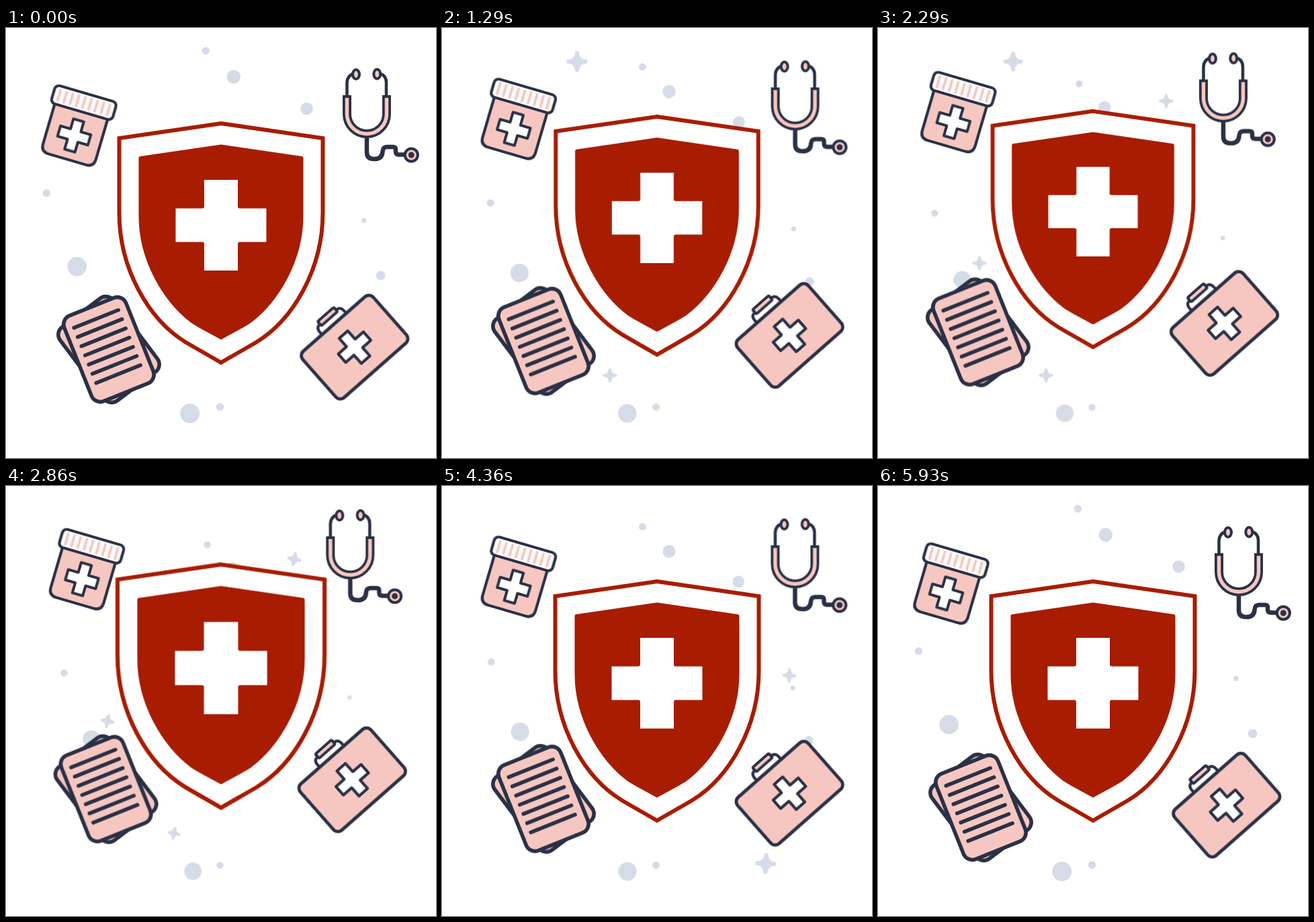
An HTML page that plays this animation: 640 px wide and 640 px high, repeating every 6000 ms.

```html
<!DOCTYPE html>
<html lang="en">
<head>
<meta charset="utf-8">
<title>Health shield</title>
<style>
  html, body { margin: 0; width: 100%; height: 100%; overflow: hidden; background: #fff; }
  svg { display: block; width: 100vw; height: 100vh; }

  .drift, .rise, .pulse, #dots {
    animation: 6s cubic-bezier(.333, 0, .667, 1) infinite;
  }
  .drift { animation-name: drift; }
  .rise { animation-name: rise; }
  .pulse { animation-name: pulse; transform-origin: 320px 320px; }
  #dots { animation-name: shrink; transform-origin: 320px 570px; fill: #d5dbe7; }
  .wobble { animation: wobble 1s -.21s ease-in-out infinite alternate; }

  @keyframes drift {
    0%, 97.6%, 100% { transform: none; }
    45.5% { transform: translate(var(--x), var(--y)); }
  }
  @keyframes shrink {
    0%, 98.5%, 100% { transform: none; }
    46.5% { transform: scale(.9); }
  }
  @keyframes rise {
    0% { transform: none; animation-timing-function: cubic-bezier(.3, .15, .7, .85); }
    44.5% { transform: translateY(-23px); }
    72.3%, 100% { transform: none; }
  }
  @keyframes pulse {
    0%, 19% { transform: none; }
    31.5% { transform: scale(.954); }
    45% { transform: scale(1.02); }
    56%, 100% { transform: none; }
  }
  @keyframes wobble {
    from { transform: rotate(-12deg); }
    to { transform: rotate(12deg); }
  }

  .line { fill: none; stroke: #2a3146; stroke-linecap: round; stroke-linejoin: round; }
  .pink { fill: #f6c7c0; }
  .white { fill: #fff; }
  .pale { fill: #d5dbe7; stroke: #d5dbe7; stroke-linejoin: round; }
  .red { stroke: #a81c02; stroke-linejoin: round; }
</style>
</head>
<body>
<svg viewBox="0 0 640 640">
  <defs>
    <path id="plus" d="M-8-23.5H8V-8H23.5V8H8V23.5H-8V8H-23.5V-8H-8Z"/>
    <rect id="sheet" x="-49.5" y="-68.5" width="99" height="137" rx="14"/>
    <path id="star" d="M0-12Q.8-.8 12 0Q.8.8 0 12Q-.8.8-12 0Q-.8-.8 0-12Z"/>
  </defs>

  <g id="dots"></g>
  <g id="stars"></g>

  <g class="rise"><g class="pulse">
    <path class="red" fill="#fff" stroke-width="6" style="stroke-linejoin:miter"
      d="M320 142L471.5 164V275C471.5 358 428 434 372 468C355 478 337 488 320 498C303 488 285 478 268 468C212 434 168.5 358 168.5 275V164Z"/>
    <path class="red" fill="#a81c02" stroke-width="5"
      d="M320 176L440 193.5V280C440 345 404 406 362 437.5C349 446 334 453 320 461C306 453 291 446 278 437.5C236 406 200 345 200 280V193.5Z"/>
    <path fill="#fff"
      d="M295 226H345V265.5Q345 268.5 348 268.5H387.5V318.5H348Q345 318.5 345 321.5V361H295V321.5Q295 318.5 292 318.5H252.5V268.5H292Q295 268.5 295 265.5Z"/>
  </g></g>

  <!-- pill bottle -->
  <g class="drift" style="--x:11.6px;--y:-21.5px">
    <g class="line" stroke-width="4.2" transform="translate(101.5 160) rotate(16.3)">
      <path class="pink" d="M-41-39V25Q-41 37-29 37H29Q41 37 41 25V-39Z"/>
      <rect class="white" x="-47.5" y="-65" width="95" height="28" rx="6.5"/>
      <path id="ridges" stroke="#f6c7c0" stroke-width="4"/>
      <use href="#plus" class="white" stroke-width="4"/>
    </g>
  </g>

  <!-- stethoscope -->
  <g class="drift" style="--x:-24.8px;--y:-25.2px">
    <g class="line" stroke-width="4.5">
      <path d="M507.5 102V81Q508 71 517 68M566 102V81Q566 71 557 68"/>
      <ellipse class="pink" cx="521" cy="69" rx="5" ry="7" stroke-width="4"/>
      <ellipse class="pink" cx="552.3" cy="68.5" rx="5" ry="7" stroke-width="4"/>
      <path stroke-width="6.5" d="M537 163V185Q537 195 548 195Q560 195 560.5 184Q561 177 567 177H576Q580 177 580 181V184Q580 188.5 585 188.5H594"/>
      <path stroke-width="13" stroke-linecap="butt" d="M507.5 100V128A29.5 29.5 0 0 0 566.5 128V100"/>
      <path stroke="#f6c7c0" stroke-width="5.4" stroke-linecap="butt" d="M507.5 104V128A29.5 29.5 0 0 0 566.5 128V104"/>
      <circle class="pink" cx="603.3" cy="189" r="9.6" stroke-width="4"/>
      <circle cx="603.3" cy="189" r="2.2"/>
    </g>
  </g>

  <!-- papers -->
  <g class="drift" style="--x:-4.4px;--y:-27.5px">
    <g class="line" stroke-width="5.6" transform="translate(153 478.5)">
      <use href="#sheet" class="pink" transform="rotate(-37)"/>
      <g transform="rotate(-21.8)">
        <use href="#sheet" class="pink"/>
        <path id="text"/>
      </g>
    </g>
  </g>

  <!-- first aid kit -->
  <g class="drift" style="--x:-3.5px;--y:-38px">
    <g class="line" stroke-width="4.8" transform="translate(518.8 475) rotate(-41.4)">
      <path class="white" stroke-width="4.2" d="M-24-46V-51Q-24-60-15-60H15Q24-60 24-51V-46"/>
      <rect class="pink" x="-16" y="-65" width="32" height="8.5" rx="2" stroke-width="4.2"/>
      <rect class="pink" x="-70" y="-46" width="140" height="92" rx="9"/>
      <use href="#plus" class="white" stroke-width="4" transform="scale(1.06)"/>
    </g>
  </g>
</svg>
<script>
  const LOOP = 6000, POP = 600;
  const $ = id => document.getElementById(id);

  function add(parent, tag, attrs) {
    const el = document.createElementNS('http://www.w3.org/2000/svg', tag);
    for (const key in attrs) el.setAttribute(key, attrs[key]);
    return parent.appendChild(el);
  }

  const repeat = (n, fn) => Array.from({ length: n }, (_, i) => fn(i)).join('');
  $('ridges').setAttribute('d', repeat(9, i => `M${(i - 4) * 9.6}-59v16`));
  $('text').setAttribute('d', repeat(7, i => `M-36 ${(i - 3) * 14.75 - 5}h71`));

  function dot(cx, cy, r) {
    add($('dots'), 'circle', { cx, cy, r });
  }

  // Pops in at start, is gone at end (ms).
  function star(x, y, size, start, end) {
    const spot = add($('stars'), 'g', { transform: `translate(${x} ${y}) scale(${size})` });
    const grow = add(spot, 'g', {});
    add(grow, 'use', { href: '#star', class: 'pale wobble', 'stroke-width': 6 });
    const easing = 'cubic-bezier(.333, 0, .667, 1)';
    const key = (ms, s) => ({ offset: ms / LOOP, transform: `scale(${s})`, easing });
    grow.animate(
      [key(0, 0), key(start, 0), key(start + POP, 1), key(end - POP, 1), key(end, 0), key(LOOP, 0)],
      { duration: LOOP, iterations: Infinity }
    );
  }

  dot(297.3, 34, 5.7);
  dot(338.8, 72.7, 10.2);
  dot(447.5, 120, 9.3);
  dot(60.5, 245.8, 5.7);
  dot(532.7, 286.5, 3.7);
  dot(105.7, 355, 14.3);
  dot(557.6, 368.4, 6.8);
  dot(273.7, 573.7, 14.4);
  dot(318.5, 564, 5.7);

  const BIG = 1.04, SMALL = .71;
  star(201, 50, BIG, 270, 2800);
  star(250, 517, SMALL, 270, 3350);
  star(429, 109, SMALL, 1300, 4300);
  star(151, 350, SMALL, 1300, 4150);
  star(517, 282, SMALL, 2850, 5400);
  star(482, 562, BIG, 2850, 5400);
</script>
</body>
</html>
```
